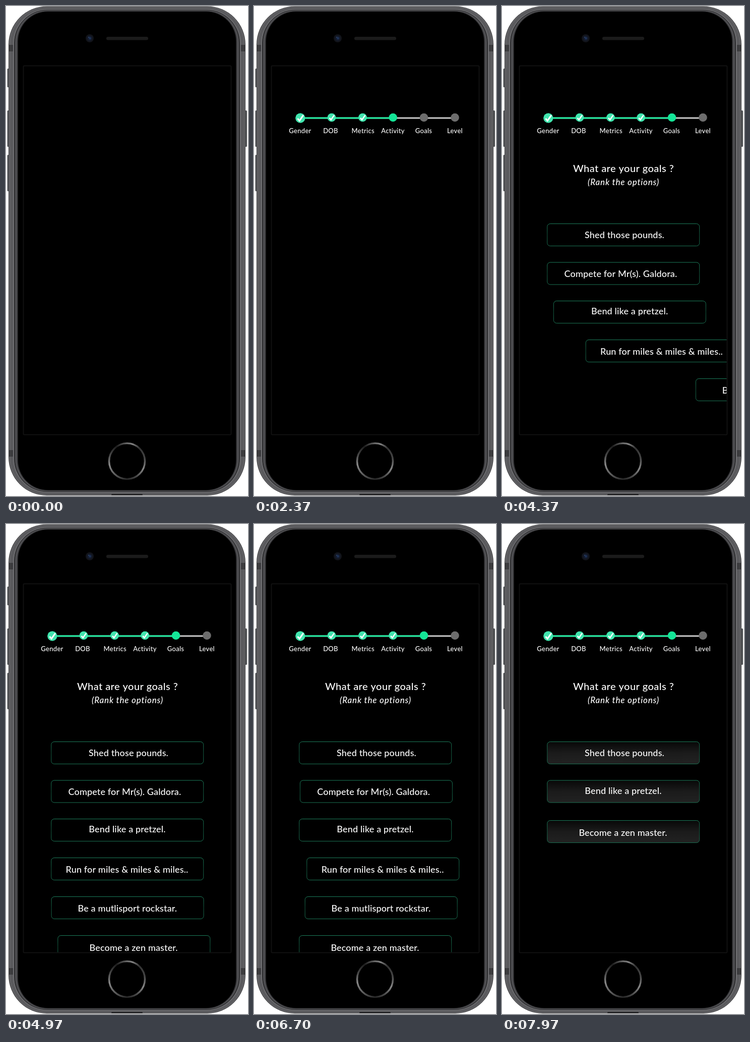
Recreate the animation shown at these times as an HTML page with a canvas. Size 480 by 971 pixels, loop 8 s.

```html
<!DOCTYPE html>
<html lang="en">
<head>
<meta charset="utf-8">
<title>Onboarding goals</title>
<style>
html, body { margin: 0; width: 100%; height: 100%; overflow: hidden; background: #fff; }
canvas { display: block; width: 480px; height: 971px; }
</style>
</head>
<body>
<canvas id="stage"></canvas>
<script>
const W = 480, H = 971, LOOP = 8000;
const canvas = document.getElementById('stage');
const ctx = canvas.getContext('2d');
const dpr = window.devicePixelRatio || 1;
canvas.width = W * dpr;
canvas.height = H * dpr;

const FONT = 'Lato, "Open Sans", sans-serif';
const GREEN = '#14e597';

const clamp = v => Math.min(1, Math.max(0, v));
const ramp = (t, from, to) => clamp((t - from) / (to - from));
const mix = (a, b, p) => a + (b - a) * p;

// cubic-bezier(.25, .1, .25, 1)
function ease(x) {
  if (x <= 0 || x >= 1) return clamp(x);
  let lo = 0, hi = 1, s = x;
  for (let i = 0; i < 24; i++) {
    s = (lo + hi) / 2;
    if (0.75 * s * (1 - s) + s * s * s < x) lo = s; else hi = s;
  }
  return 0.3 * s * (1 - s) ** 2 + 3 * s * s * (1 - s) + s ** 3;
}
const slide = (t, start, dur = 740) => ease((t - start) / dur);
// starts with a small pull in the other direction
const backIn = x => 2.15 * x ** 3 - 1.15 * x ** 2;

function box(x, y, w, h, r, fill, stroke, line = 1) {
  ctx.beginPath();
  ctx.roundRect(x, y, w, h, r);
  if (fill) { ctx.fillStyle = fill; ctx.fill(); }
  if (stroke) { ctx.strokeStyle = stroke; ctx.lineWidth = line; ctx.stroke(); }
}

function disc(x, y, r, fill) {
  ctx.beginPath();
  ctx.arc(x, y, r, 0, 7);
  ctx.fillStyle = fill;
  ctx.fill();
}

function line(x1, x2, y, color, width) {
  ctx.beginPath();
  ctx.moveTo(x1, y);
  ctx.lineTo(x2, y);
  ctx.strokeStyle = color;
  ctx.lineWidth = width;
  ctx.stroke();
}

function label(str, x, y, style, spacing) {
  ctx.font = `${style} ${FONT}`;
  ctx.letterSpacing = spacing + 'px';
  ctx.textAlign = 'center';
  ctx.fillStyle = '#fff';
  ctx.fillText(str, x, y);
}

function gradient(x1, y1, x2, y2, colors) {
  const g = ctx.createLinearGradient(x1, y1, x2, y2);
  colors.forEach((c, i) => g.addColorStop(i / (colors.length - 1), c));
  return g;
}

function drawPhone() {
  ctx.fillStyle = '#fff';
  ctx.fillRect(0, 0, W, H);

  const key = gradient(2, 0, 7, 0, ['#38393b', '#5c5f62', '#2c2d2f']);
  for (const [y, h] of [[124, 37], [207, 72], [295, 72]]) box(2.5, y, 6, h, 1.5, key);
  box(472, 207, 6, 72, 1.5, gradient(473, 0, 478, 0, ['#2c2d2f', '#5c5f62', '#38393b']));

  box(5, 0.5, 470, 969.5, 76, '#3c3c3e');
  box(6.2, 1.4, 467.6, 967.7, 75, '#69696c');
  box(8, 2.6, 464, 965.3, 73, '#5a5a5d');
  box(14, 6.2, 452, 958, 68, '#6f6f72');
  box(16, 7.6, 448, 955.2, 66, '#2a2a2c');
  box(18, 8.6, 444, 953, 64, '#4e4e51');
  box(22.3, 10.2, 435.4, 950, 61, '#262628');
  box(24, 11.3, 432, 947.8, 59, '#000');

  ctx.fillStyle = '#3c3c3e';
  for (const y of [77, 880]) {
    ctx.fillRect(5, y, 9, 13);
    ctx.fillRect(466, y, 9, 13);
  }
  box(209, 967, 62, 3, 1.5, '#252527');

  disc(166, 64, 8, '#12141a');
  disc(166, 64, 5.2, '#131a2b');
  disc(166.5, 64, 2.4, '#1d3054');
  disc(164, 62, 1, '#34486c');
  box(199, 61, 83, 6.5, 3.2, '#1b1b1b');
  box(34.5, 118.5, 412, 731, 2, null, '#111', 2);

  const ring = ctx.createConicGradient(-Math.PI / 2, 240, 902);
  [[0, '#6a6a6a'], [0.05, '#808080'], [0.12, '#333'], [0.22, '#444'], [0.32, '#858585'],
   [0.42, '#444'], [0.5, '#262626'], [0.6, '#555'], [0.72, '#888'],
   [0.8, '#4a4a4a'], [0.9, '#1c1c1c'], [1, '#6a6a6a']].forEach(([p, c]) => ring.addColorStop(p, c));
  ctx.beginPath();
  ctx.arc(240, 902, 35.5, 0, 7);
  ctx.strokeStyle = ring;
  ctx.lineWidth = 3.5;
  ctx.stroke();
}

const steps = [
  { name: 'Gender', x: 91.8, tx: 91.5 },
  { name: 'DOB', x: 154, tx: 152 },
  { name: 'Metrics', x: 215.5, tx: 216.3 },
  { name: 'Activity', x: 275.7, tx: 275.5 },
  { name: 'Goals', x: 337, tx: 336.5 },
  { name: 'Level', x: 398.5, tx: 398.5 }
];

function drawTick(x, y, size, alpha) {
  ctx.save();
  ctx.globalAlpha *= alpha;
  ctx.translate(x, y);
  ctx.scale(size, size);
  ctx.beginPath();
  ctx.moveTo(-4.5, 0.8);
  ctx.lineTo(-1.3, 4.4);
  ctx.lineTo(5, -4.6);
  ctx.strokeStyle = '#fff';
  ctx.lineWidth = 2.5;
  ctx.stroke();
  ctx.restore();
}

function drawStepper(t) {
  ctx.save();
  ctx.globalAlpha = ramp(t, 450, 1310);
  const y = 221, lineY = 222;
  let head = mix(steps[0].x, steps[3].x, ramp(t, 1330, 1500));
  head = mix(head, steps[4].x, ramp(t, 2360, 2560));
  line(steps[0].x, steps[5].x, lineY, '#c9c9c9', 2.8);
  line(steps[0].x, head, lineY, GREEN, 2.8);
  steps.forEach((s, i) => {
    const done = i < 3 ? ramp(t, 1590, 1700) : i === 3 ? ramp(t, 2560, 2700) : 0;
    const r = i ? 8.3 : 8.5 + done;
    const cy = i ? y : y + 1;
    disc(s.x, cy, r, head >= s.x - 0.01 ? GREEN : '#6d6d6d');
    if (done) {
      ctx.save();
      ctx.globalAlpha *= done;
      disc(s.x, cy, r, '#42e4ae');
      ctx.restore();
      drawTick(s.x, cy, i ? 1 : 1.2, done);
    }
    label(s.name, s.tx, 252, '500 13px', 0.3);
  });
  ctx.restore();
}

function drawTitles(t) {
  label('What are your goals ?', 241 + 357 * (1 - slide(t, 2450)), 329, '500 20px', 0.45);
  label('(Rank the options)', 241 + 357 * (1 - slide(t, 2690)), 355, 'italic 500 17px', 0.8);
}

// dy: text centre below the box top; inAt, outAt, upAt: start times
const options = [
  { text: 'Shed those pounds.', y: 431.5, tx: 243, dy: 22.5, inAt: 3508 },
  { text: 'Compete for Mr(s). Galdora.', y: 508, tx: 235.5, dy: 22.5, inAt: 3635, outAt: 6660 },
  { text: 'Bend like a pretzel.', y: 584.5, tx: 240.5, dy: 20.5, inAt: 3807, upAt: 7089, to: 508 },
  { text: 'Run for miles & miles & miles..', y: 661.5, tx: 240, dy: 23.5, inAt: 4013, outAt: 6540 },
  { text: 'Be a mutlisport rockstar.', y: 738.5, tx: 240.5, dy: 23.5, inAt: 4264, outAt: 6420 },
  { text: 'Become a zen master.', y: 815.5, tx: 240, dy: 24, inAt: 4410, upAt: 7206, to: 584.5 }
];

function drawOption(o, t) {
  let dx = 357 * (1 - slide(t, o.inAt));
  let y = o.y;
  if (o.outAt) dx -= 366 * backIn(ramp(t, o.outAt, o.outAt + 600));
  if (o.upAt) y = mix(o.y, o.to, slide(t, o.upAt, 900));
  const x = 89.7 + dx;
  if (x > 446 || x < -270) return;

  const fill = o.outAt ? 0 : ramp(t, 7060, 7900);
  if (fill) {
    ctx.save();
    ctx.globalAlpha = fill;
    box(x, y, 302, 44, 6, gradient(0, y, 0, y + 44, ['#080808', '#1b1b1b', '#222']));
    ctx.restore();
  }
  box(x, y, 302, 44, 6, null,
    gradient(0, y, 0, y + 44, ['#1c7d5b', '#14573f', '#1a7253']));
  label(o.text, o.tx + dx, y + o.dy + 6.3, '500 18px', 0.15);
}

function drawPointer(t) {
  const alpha = ramp(t, 5520, 5640) * (1 - ramp(t, 6080, 6240));
  if (!alpha) return;
  const p = slide(t, 5530, 440);
  ctx.save();
  ctx.globalAlpha = alpha;
  disc(mix(429, 333.5, p), mix(760, 442, p), 22.8, 'rgba(144,144,144,.88)');
  ctx.restore();
}

function draw(t) {
  ctx.setTransform(dpr, 0, 0, dpr, 0, 0);
  drawPhone();
  ctx.save();
  ctx.beginPath();
  ctx.rect(35.5, 119.5, 410, 729);
  ctx.clip();
  drawStepper(t);
  drawTitles(t);
  options.forEach(o => drawOption(o, t));
  ctx.restore();
  drawPointer(t);
}

const begin = performance.now();
function tick() {
  draw((performance.now() - begin) % LOOP);
  requestAnimationFrame(tick);
}
tick();
</script>
</body>
</html>
```
